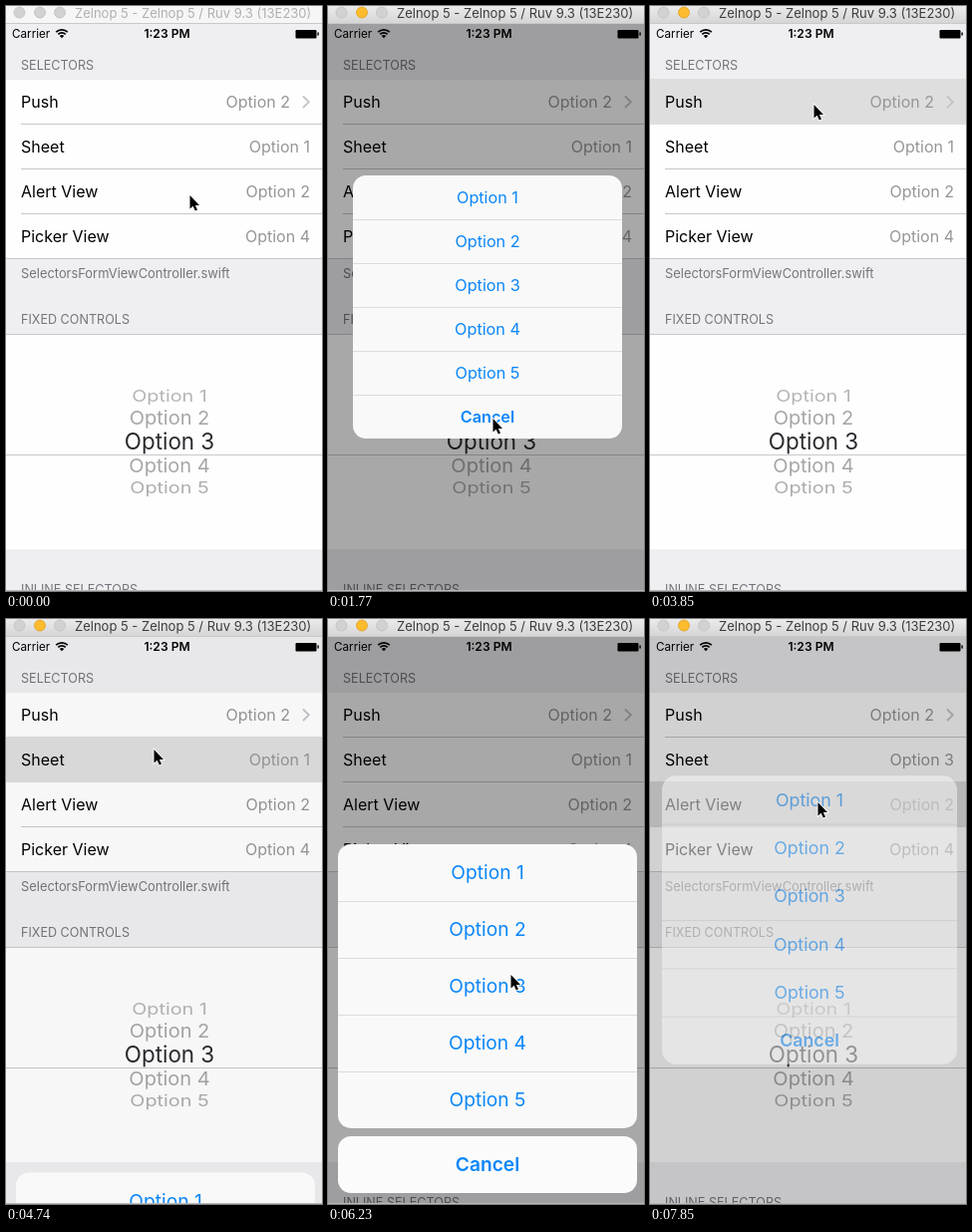
Write an HTML page that moves like this. It is 317 px wide and 587 px high and loops after 8 s.

```html
<!DOCTYPE html>
<html lang="en">
<head>
<meta charset="utf-8">
<title>Selector form</title>
<style>
  html, body { margin: 0; width: 100%; height: 100%; overflow: hidden; }
  svg { display: block; width: 100vw; height: 100vh; font-family: Inter, Roboto, sans-serif; }
</style>
</head>
<body>
<svg id="stage" viewBox="0 0 317 587"></svg>
<script>
const LOOP = 8000;
const TICKS = 54; // the screen refreshes in coarse, even ticks
const TICK = LOOP / TICKS;
const BLUE = '#0a86f8', GREY = '#969699', HEADER = '#74747a', LINE = '#c8c7cc';
const options = [1, 2, 3, 4, 5].map(n => `Option ${n}`);

// Text is placed by the vertical centre of its capitals.
const text = (str, x, cy, size, fill, attrs = '') =>
  `<text x="${x}" y="${cy + size * 0.36}" font-size="${size}" fill="${fill}" ${attrs}>${str}</text>`;
const rect = (x, y, w, h, fill, attrs = '') =>
  `<rect x="${x}" y="${y}" width="${w}" height="${h}" fill="${fill}" ${attrs}/>`;
const MIDDLE = 'text-anchor="middle"', END = 'text-anchor="end"';

function titleBar() {
  const dots = [13.5, 34, 54].map((x, i) =>
    `<circle cx="${x}" cy="6.5" r="5.5" fill="#d2d2d2" stroke="#bfbfbf" stroke-width=".8" ${i === 1 ? 'id="amber"' : ''}/>`);
  return `<linearGradient id="bar" x2="0" y2="1"><stop stop-color="#ebebeb"/><stop offset="1" stop-color="#d4d4d4"/></linearGradient>`
    + rect(0, 0, 317, 18, '#f6f6f6', 'id="titleBack"') + rect(0, 17, 317, 1, '#c9c9c9') + dots.join('')
    + text('Zelnop 5 - Zelnop 5 / Ruv 9.3 (13E230)', 69, 7.5, 13, '#b0b0b0', 'id="title"');
}

function statusBar() {
  const arcs = [[8.2, 1.7], [5.2, 1.7]].map(([r, w]) => {
    const d = r * 0.707;
    return `<path d="M${56 - d} ${32 - d}A${r} ${r} 0 0 1 ${56 + d} ${32 - d}" fill="none" stroke="#000" stroke-width="${w}"/>`;
  });
  return text('Carrier', 6, 28, 11.7, '#000') + arcs.join('')
    + '<path d="M56 32.3L53.8 30A3.1 3.1 0 0 1 58.2 30Z"/>'
    + text('1:23 PM', 161.5, 28, 12.1, '#000', MIDDLE + ' font-weight="600"')
    + rect(290.5, 24, 21, 8.5, '#000', 'rx="1.2"') + rect(312.4, 26.3, 1.4, 3.4, '#000', 'rx=".7"');
}

function form() {
  const rows = [['Push', 2], ['Sheet', 1], ['Alert View', 2], ['Picker View', 4]];
  const wheel = [[391, 19.8, 0.83, '#b5b5b5'], [413, 20, 0.95, '#a6a6a8'], [437, 22.4, 1, '#2b2b30'],
                 [461, 20, 0.95, '#a6a6a8'], [483, 19.8, 0.83, '#adadae']];
  return rect(0, 18, 317, 569, '#efeff2') + statusBar()
    + rect(0, 74, 317, 180, '#fefefe') + rect(0, 330, 317, 215, '#fefefe')
    + [118, 163, 208].map(y => rect(15, y, 302, 1, LINE)).join('')
    + [253, 329, 450].map(y => rect(0, y, 317, 1, LINE)).join('')
    + rect(0, 0, 317, 46, '#dedede', 'id="highlight"')
    + rows.map(([label, n], i) => {
        const y = 96 + 45 * i;
        return text(label, 15, y, 16, '#000')
          + text(`Option ${n}`, i ? 305 : 285, y, 16, GREY, END + ` id="value${i}"`);
      }).join('')
    + '<path d="M298 90.5L303.8 96.3L298 102" fill="none" stroke="#c3c3c8" stroke-width="1.8"/>'
    + text('SELECTORS', 15, 59, 12.6, HEADER)
    + text('SelectorsFormViewController.swift', 15, 268.5, 12.9, HEADER)
    + text('FIXED CONTROLS', 15, 314.5, 12.6, HEADER)
    + text('INLINE SELECTORS', 15, 585, 12.6, HEADER)
    + wheel.map(([y, size, squash, fill], i) =>
        `<g transform="translate(164 ${y}) scale(1 ${squash})">${text(options[i], 0, 0, size, fill, MIDDLE)}</g>`).join('');
}

// A stack of blue buttons separated by hairlines.
const buttons = (labels, top, height, size, left, width) => labels.map((label, i) =>
  (i ? rect(left, top + height * i, width, 1, '#dcdce0') : '')
  + text(label, 160, top + height * (i + 0.5), size, BLUE,
      MIDDLE + (label === 'Cancel' ? ' font-weight="600"' : ''))).join('');

const alertBox = () => rect(25, 170, 270, 264, '#f9f9f9', 'rx="13"')
  + buttons([...options, 'Cancel'], 170, 44, 16.2, 25, 270);

const sheetBox = () => rect(10, 226, 300, 285, '#f9f9f9', 'rx="13"')
  + buttons(options, 226, 57, 19.2, 10, 300)
  + rect(10, 519, 300, 57, '#fbfbfb', 'rx="13"') + buttons(['Cancel'], 519, 57, 19.2, 10, 300);

document.getElementById('stage').innerHTML = form()
  + rect(0, 18, 317, 569, '#000', 'id="dim"')
  + `<g id="sheet">${sheetBox()}</g><g id="alert">${alertBox()}</g>`
  + titleBar() + rect(0, 586, 317, 1, '#b8b8b8')
  + '<path id="cursor" d="M.5 1V14.6L3.6 11.7L5.8 16.6L8 15.6L5.9 10.9H10Z" stroke="#fff" stroke-width="1.6" paint-order="stroke"/>';

const el = id => document.getElementById(id);
const set = (id, attrs) => { for (const key in attrs) el(id).setAttribute(key, attrs[key]); };

// Critically damped spring from 0 to 1, settled at 99%.
function spring(x) {
  if (x <= 0) return 0;
  const p = 1 - (1 + x) * Math.exp(-x);
  return p > 0.99 ? 1 : p;
}
const rise = (tick, start) => spring((tick - start) * 1.93);
const fall = (tick, start) => 1 - spring((tick - start) * 4.44);

// Pointer stops: tick, x, y
const stops = [[0, 184, 189], [7, 184, 189], [10, 197, 300], [12, 165, 413], [18, 165, 413],
  [24, 164, 98], [28, 164, 98], [30, 148, 130], [32, 148, 130], [37, 141, 435], [39, 141, 435],
  [42, 183, 356], [44, 184, 368], [45, 184, 368], [51, 168, 183], [54, 168, 183]];

function pointer(tick) {
  const i = stops.findIndex(s => s[0] > tick);
  const [t0, x0, y0] = stops[i - 1], [t1, x1, y1] = stops[i];
  const u = (tick - t0) / (t1 - t0), e = u * u * (3 - 2 * u);
  return [x0 + (x1 - x0) * e, y0 + (y1 - y0) * e];
}

// Pressed rows: from tick, to tick, row index
const presses = [[1, 3, 2], [26, 32, 0], [32, 33, 1], [52, 54, 2]];

function draw(tick) {
  const active = tick >= 1;
  set('titleBack', { fill: active ? 'url(#bar)' : '#f6f6f6' });
  set('title', { fill: active ? '#3c3c3c' : '#b0b0b0' });
  set('amber', { fill: active ? '#fdbc2e' : '#d2d2d2', stroke: active ? '#dfa023' : '#bfbfbf' });

  const press = presses.find(([from, to]) => tick >= from && tick < to);
  set('highlight', { opacity: press ? 1 : 0, y: press ? 73 + 45 * press[2] : 0 });
  el('value1').textContent = tick < 46 ? 'Option 1' : 'Option 3';

  const again = tick >= 52;
  const grown = rise(tick, again ? 52.1 : 1.1);
  const alert = again ? grown : grown * fall(tick, 16.7);
  const scale = 1 + 0.2 * (1 - grown);
  set('alert', { opacity: alert, transform: `translate(160 302) scale(${scale}) translate(-160 -302)` });

  const sheet = rise(tick, 31.75) * fall(tick, 43.85);
  set('sheet', { transform: `translate(0 ${360 * (1 - sheet)})`, opacity: sheet ? 1 : 0 });
  set('dim', { opacity: 0.34 * Math.max(alert, sheet) });
  set('cursor', { transform: `translate(${pointer(tick)})` });
}

function loop() {
  const time = performance.now() % LOOP;
  draw(Math.min(TICKS - 1, Math.floor((time + 9) / TICK)));
  requestAnimationFrame(loop);
}
loop();
</script>
</body>
</html>
```
